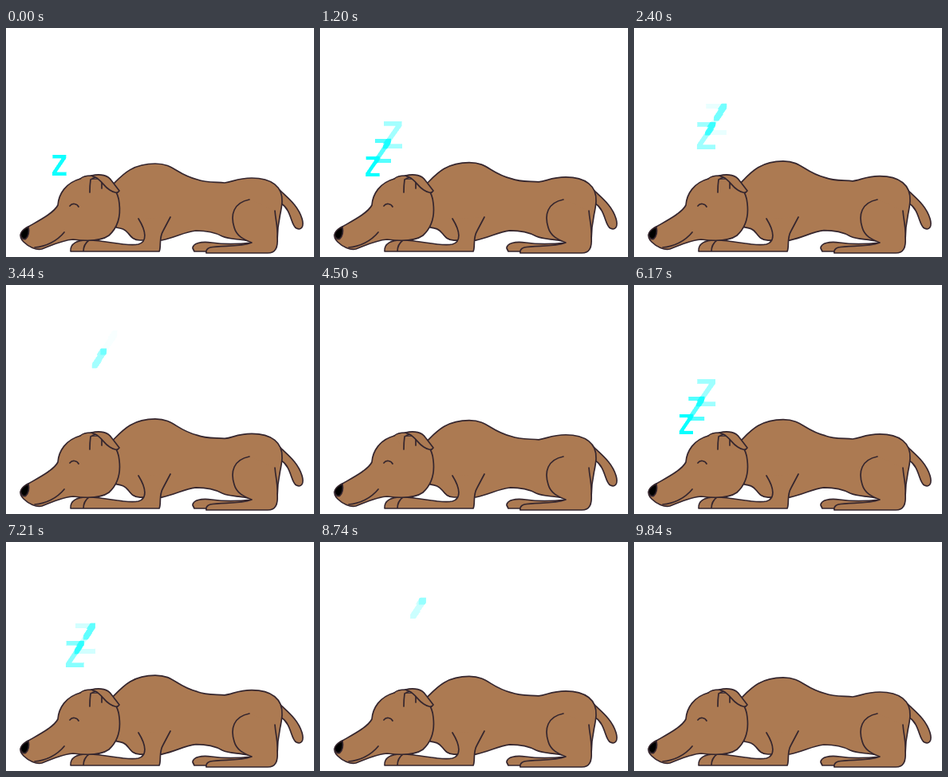
Recreate the animation shown at these times as an HTML page. Size 386 px wide and 287 px high, loop 9870 ms.

```html
<!DOCTYPE html>
<html lang="en">
<head>
<meta charset="utf-8">
<title>Sleeping dog</title>
<style>
  html, body { margin: 0; width: 100%; height: 100%; overflow: hidden; background: #fff; }
  svg { display: block; width: 100vw; height: 100vh; }
  .dog { fill: #ac7a52; stroke: #35262e; stroke-width: 1.7; stroke-linecap: round; stroke-linejoin: round; }
  .line { fill: none; }
  .zs { fill: #0ff; stroke: #0ff; stroke-width: .5; font: bold 33.6px "DejaVu Sans Mono", monospace; text-anchor: middle; }
</style>
</head>
<body>
<svg viewBox="0 0 386 287">
  <!-- Faint letters vanish unless they overlap -->
  <filter id="fade" filterUnits="userSpaceOnUse" x="0" y="0" width="386" height="287" color-interpolation-filters="sRGB">
    <feComponentTransfer><feFuncA type="linear" slope="2.5" intercept="-1.5"/></feComponentTransfer>
  </filter>

  <g class="dog">
    <path d="M343 203C352 212 366 222 371 239C374 249 370 254 364 251C357 248 358 228 345 220Z"/>
    <path id="body" d="M134 196C146 184 158 170 187 170C211 170 212 183 240 190C250 194 262 193 274 194C284 193 290 188 308 188C333 188 347 199 346 218C345 234 340 240 340 266L305 267C290 264 280 265 271 261C260 255 250 254 238 254C222 256 214 262 195 266L168 266C160 266 157 262 153 257C149 252 145 251 138 250Z"/>

    <!-- Hind legs -->
    <path d="M308 269C290 271 272 271 258 269C244 267 234 270 234 276L236 280H290Z"/>
    <path d="M305 214C285 219 281 234 286 250C289 261 298 265 308 269C292 275 270 272 256 275Q250 277 251 282H328C338 282 341 275 340 262C341 250 338 242 337 229" stroke="none"/>
    <path class="line" d="M305 215C285 219 281 234 286 250C289 261 298 265 308 269C292 275 270 272 256 275Q250 277 251 282H328C338 282 341 275 340 262C341 250 338 242 337 229"/>

    <!-- Front leg -->
    <path d="M166 239C176 255 177 268 166 271C148 274 126 266 104 266C90 265 80 270 81 280H192C195 274 191 264 197 254L206 237" stroke="none"/>
    <path class="line" d="M166 239C176 255 177 268 166 271C148 274 126 266 104 266C90 265 80 270 81 280H192C195 274 191 264 197 254L206 237M104 266Q97 271 97 280"/>

    <!-- Head -->
    <path d="M93 189C75 194 66 208 65 222C60 232 40 242 28 249C18 255 15 261 22 268C28 274 38 279 45 277C58 272 70 266 84 265C100 267 118 268 129 260C140 250 144 237 142 220C141 205 131 193 120 189Z"/>
    <path d="M28 249C20 253 17 258 19 262Q22 266 25 264Q30 259 28 249Z" fill="#000"/>
    <path class="line" d="M36 275C50 274 64 267 73 256M80 223C83 219 89 220 91 224"/>
    <path d="M93 189Q97 185 107 185L112 187L106 190Q105 197 105 206"/>
    <path d="M107 185C119 182 128 185 132 191L142 204Q139 209 130 203C122 198 120 191 112 187Z"/>
    <path class="line" d="M120 194V201"/>
  </g>

  <g class="zs" filter="url(#fade)">
    <text y="12.3">Z</text>
    <text y="12.3">Z</text>
    <text y="12.3">Z</text>
  </g>
</svg>
<script>
  const LOOP = 9.87, CYCLE = 5, LEAD = 0.12, GAP = 0.62, FADE = 5.2;
  const FLOOR = 262;
  const body = document.getElementById("body");
  const letters = document.querySelectorAll(".zs text");

  function draw(now) {
    const phase = (now / 1000 % LOOP) % CYCLE;

    const breath = 1 + 0.0165 * (1 - Math.cos(2 * Math.PI * phase / CYCLE));
    body.setAttribute("transform", `translate(0 ${FLOOR * (1 - breath)}) scale(1 ${breath})`);

    letters.forEach((letter, i) => {
      const age = (phase + LEAD - i * GAP + CYCLE) % CYCLE;
      const x = 64 + 20.2 * age, y = 176.5 - 32.4 * age;
      letter.setAttribute("transform", `translate(${x} ${y}) scale(${1 + 0.3 * age})`);
      letter.setAttribute("opacity", Math.max(0, 1 - age / FADE));
    });
    requestAnimationFrame(draw);
  }
  draw(performance.now());
</script>
</body>
</html>
```
